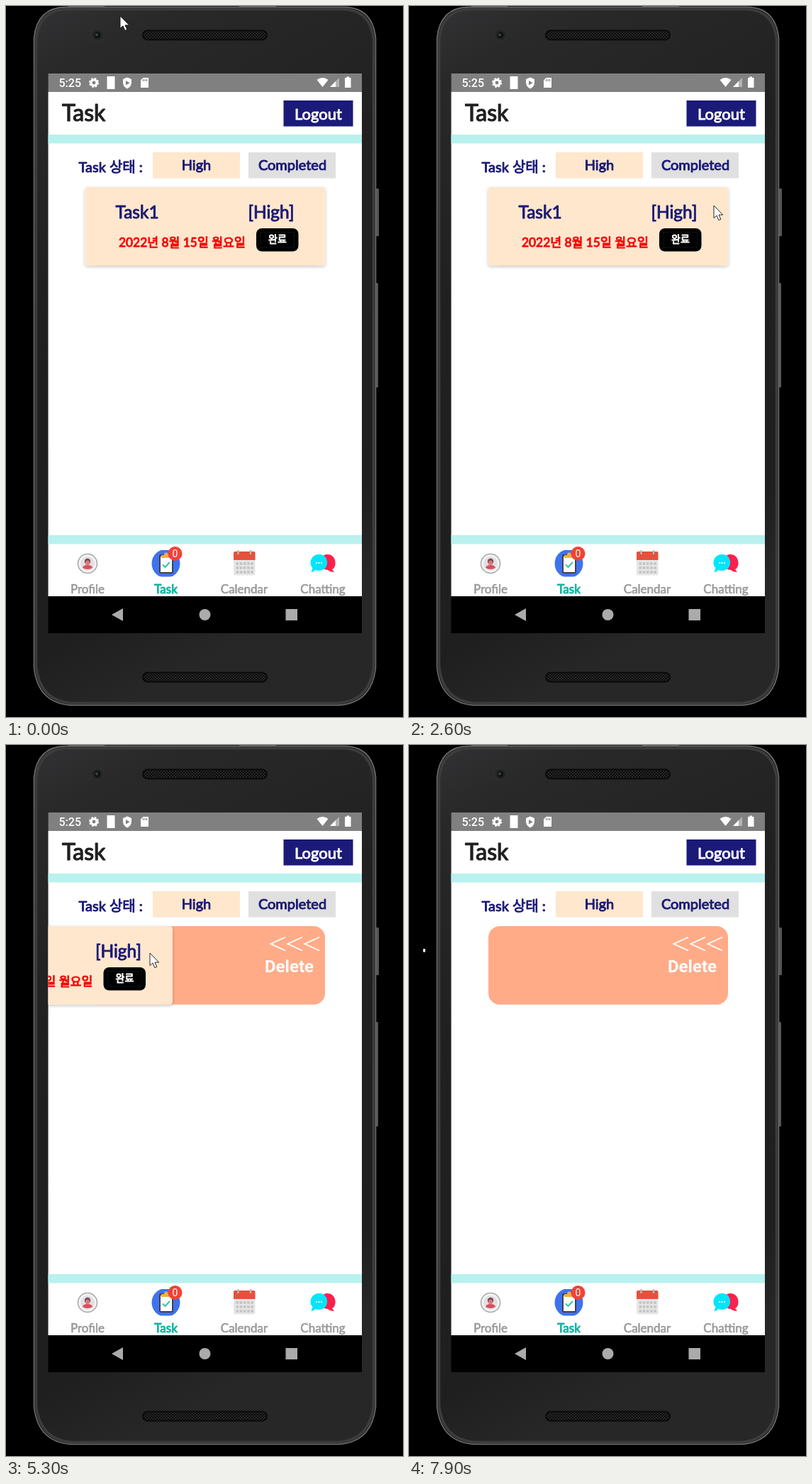
Recreate the animation shown at these times as an HTML page. Size 560 by 1001 pixels, loop 8 s.

```html
<!DOCTYPE html>
<html lang="ko">
<head>
<meta charset="utf-8">
<title>Task list</title>
<style>
html, body { margin: 0; width: 100%; height: 100%; overflow: hidden; background: #000; }
svg { display: block; width: 560px; height: 1001px; }
text { font-family: Lato, "Noto Sans CJK KR", "Noto Sans CJK", sans-serif; stroke-linecap: round; stroke-linejoin: round; stroke: currentColor; stroke-width: .95px; fill: currentColor; }
.mid { text-anchor: middle; }
.navy { color: #1b1a75; }
.title { font-size: 32px; color: #202020; stroke-width: 1.2px; }
.sys { font-family: Roboto, sans-serif; stroke: none; }
.label { font-size: 17px; color: #999; text-anchor: middle; stroke-width: .6px; }
.label.on { color: #12b3a1; stroke-width: 1px; }
</style>
</head>
<body>
<svg viewBox="0 0 560 1001">
  <defs>
    <linearGradient id="body" x2=".25" y2="1">
      <stop offset="0" stop-color="#323234"/><stop offset=".1" stop-color="#29292a"/>
      <stop offset=".4" stop-color="#202020"/><stop offset=".88" stop-color="#1f1f1f"/>
      <stop offset="1" stop-color="#272727"/>
    </linearGradient>
    <pattern id="mesh" width="4" height="4" patternUnits="userSpaceOnUse">
      <rect width="4" height="4" fill="#292929"/>
      <circle cx="1" cy="1" r="1.15" fill="#080808"/><circle cx="3" cy="3" r="1.15" fill="#080808"/>
    </pattern>
    <clipPath id="screen"><rect x="59.500" y="95" width="442.500" height="736"/></clipPath>
    <clipPath id="disc"><rect x="204" y="766" width="44" height="37.500"/></clipPath>
    <filter id="shade" x="-10%" y="-10%" width="120%" height="130%">
      <feDropShadow dx="0" dy="1.500" stdDeviation="2" flood-color="#000" flood-opacity=".24"/>
    </filter>
  </defs>
  <rect width="560" height="1001"/>

  <!-- phone -->
  <g fill="#555">
    <rect x="520" y="257" width="6" height="67" rx="1"/>
    <rect x="520" y="390" width="5" height="147" rx="1"/>
    <rect x="88" width="51" height="2"/><rect x="329" width="52" height="2"/>
  </g>
  <path d="M84 1.500H477Q517 2 521.500 45V932Q516 981 470 984.500H91Q45 981 39.500 932V45Q44 2 84 1.500Z" fill="url(#body)" stroke="#707070" stroke-width="1.500"/>
  <path d="M86 4.500H475Q514 5.500 518.500 47V930Q513 978 469 981.500H92Q48 978 42.500 930V47Q47 5.500 86 4.500Z" fill="none" stroke="#3c3c3c" stroke-width="3.500"/>
  <circle cx="129" cy="41" r="8.500" fill="#242526" stroke="#333"/>
  <circle cx="129" cy="41" r="4.500" fill="#101212"/><circle cx="128" cy="40.500" r="2" fill="#3c4343"/>
  <rect x="193" y="34.500" width="175" height="13" rx="6.500" fill="url(#mesh)" stroke="#0a0a0a" stroke-width="2"/>
  <rect x="193" y="938.500" width="175" height="13" rx="6.500" fill="url(#mesh)" stroke="#0a0a0a" stroke-width="2"/>
  <rect x="59.500" y="95" width="442.500" height="788"/>

  <g clip-path="url(#screen)">
    <rect x="59" y="121" width="444" height="710" fill="#fff"/>

    <!-- status bar -->
    <rect x="59" y="95" width="444" height="26" fill="#808080"/>
    <text x="74.500" y="114" class="sys" font-size="16" font-weight="500" color="#fff">5:25</text>
    <g fill="#fff">
      <circle cx="124" cy="108" r="4" fill="none" stroke="#fff" stroke-width="3.200"/>
      <circle cx="124" cy="108" r="6" fill="none" stroke="#fff" stroke-width="2" stroke-dasharray="2.700 2.012"/>
      <rect x="142.500" y="99" width="11" height="18"/>
      <path d="M171 100.500L177 103V108Q176.500 114 171 116.500Q165.500 114 165 108V103Z"/>
      <path d="M169 105L174.500 108.300L169 111.500Z" fill="#808080"/>
      <path d="M193.500 101H201V115H190V104.500Z"/>
      <path d="M193.500 103V106M196 103V106M198.500 103V106" stroke="#808080" stroke-width="1.200"/>
      <path d="M438.500 104Q446.500 98 454.500 104L446.500 114Z"/>
      <path d="M470 101V114H457Z" opacity=".4"/><path d="M465 106V114H457Z"/>
      <path d="M480.500 101V99.500H484V101H486.500V115H478V101Z"/>
    </g>

    <!-- header -->
    <text x="79" y="161.500" class="title">Task</text>
    <rect x="391.500" y="133" width="98" height="36.500" fill="#1b1a78"/>
    <text x="440.500" y="159.500" class="mid" font-size="22" color="#fff">Logout</text>
    <rect x="59" y="181" width="444" height="12.500" fill="#b8f1ed"/>
    <rect x="59" y="745" width="444" height="12.500" fill="#b8f1ed"/>

    <!-- filter row -->
    <text x="102.500" y="233.500" class="navy" font-size="20">Task 상태 :</text>
    <rect x="207" y="206" width="123" height="36.500" fill="#ffe7cd"/>
    <text x="268.500" y="231" class="navy mid" font-size="20">High</text>
    <rect x="342" y="206" width="123" height="36.500" fill="#e0e0e0"/>
    <text x="404" y="231" class="navy mid" font-size="20">Completed</text>

    <!-- layer under the card -->
    <rect x="112" y="255" width="338" height="110.500" rx="16" fill="#ffab88"/>
    <path d="M394 270.500L373.500 280L394 289.500M418 270.500L397.500 280L418 289.500M442 270.500L421.500 280L442 289.500" fill="none" stroke="#fff" stroke-width="1.900"/>
    <text x="399.500" y="320" class="sys mid" font-size="24" font-weight="700" color="#fff">Delete</text>

    <g id="card">
      <rect x="111.500" y="255" width="339" height="110.500" rx="4" fill="#ffe7cd" filter="url(#shade)"/>
      <text x="154.500" y="298.500" class="navy" font-size="24.500">Task1</text>
      <text x="374" y="298.500" class="navy mid" font-size="24.500">[High]</text>
      <text x="248.500" y="339" class="mid" font-size="17.300" color="#f40808">2022년 8월 15일 월요일</text>
      <rect x="353" y="313" width="59.500" height="32.500" rx="8"/>
      <rect x="359" y="318.500" width="47.500" height="21.500" fill="none" stroke="#0b1218"/>
      <text x="383" y="333" class="mid" font-size="14" color="#fff">완료</text>
    </g>

    <!-- tabs -->
    <circle cx="115" cy="785" r="13.500" fill="#f4f4f4" stroke="#aaa" stroke-width="1.600"/>
    <circle cx="115" cy="785" r="10" fill="#e2dee4"/>
    <path d="M108 791Q109 787 115 787Q121 787 122 791Q119 793 115 793Q111 793 108 791Z" fill="#d9505b"/>
    <circle cx="115" cy="782" r="4.200" fill="#7d4b59"/><ellipse cx="115" cy="784" rx="2.800" ry="3.300" fill="#dc7c70"/>

    <circle cx="225.500" cy="785" r="20" fill="#3d73ee" clip-path="url(#disc)"/>
    <rect x="216" y="772" width="20" height="27" rx="2" fill="#45404b"/>
    <rect x="218" y="775" width="16" height="22" fill="#fff"/>
    <path d="M219 777V773H223Q223 769.500 226 769.500Q229 769.500 229 773H233V777Z" fill="#efb03f"/>
    <path d="M221 786.500L224.500 790L231 783" fill="none" stroke="#36c6a0" stroke-width="2"/>
    <circle cx="238.500" cy="771" r="10" fill="#f34235"/>
    <text x="238.500" y="776" class="sys mid" font-size="14" color="#fff">0</text>

    <rect x="321" y="768" width="30.500" height="33.500" rx="2" fill="#e6e6e6"/>
    <path d="M321 780V770Q321 768 323 768H349.500Q351.500 768 351.500 770V780Z" fill="#e4513c"/>
    <path d="M327.500 766V772M345 766V772" stroke="#b9b9b9" stroke-width="2.400"/>
    <path d="M324.500 785H349M324.500 791H349M324.500 797H349" stroke="#c4c4c4" stroke-width="3.500" stroke-dasharray="3.600 1.600"/>

    <path d="M453 772C467 772 467 791 460 793L463 797Q457 797 454 794C440 794 441 772 453 772Z" fill="#fa214f"/>
    <path d="M441.500 772C457 772 457 795 441.500 795Q438 795 436 794Q434 797 430.500 797L432.500 791C426 784 431 772 441.500 772Z" fill="#02e5fa"/>
    <path d="M437 784H446" stroke="#fff" stroke-width="2" stroke-dasharray="2 1.500"/>

    <text x="115" y="827" class="label">Profile</text>
    <text x="225.500" y="827" class="label on">Task</text>
    <text x="336" y="827" class="label">Calendar</text>
    <text x="447" y="827" class="label">Chatting</text>
  </g>

  <!-- system keys -->
  <g fill="#ababab">
    <path d="M149 857L165 848V866Z"/><circle cx="280.500" cy="857" r="8"/><rect x="394.500" y="849" width="16.500" height="16"/>
  </g>

  <path id="cursor" d="M0 0V17.500L4 14L6.800 20.500L9.800 19.300L7 13H12.700Z" fill="#fff" stroke="#111" stroke-width=".9"/>
  <rect id="speck" x="20" y="287" width="3" height="4.500" fill="#fff"/>
</svg>
<script>
const LOOP = 8000, STEP = 100;

// time, x, y
const pointer = [
  [0, 161, 14], [300, 215, 62], [600, 286, 140], [900, 348, 215], [1300, 393, 266],
  [1700, 413, 285], [1800, 416, 284], [2600, 430, 281], [3000, 430, 281], [3100, 429, 280],
  [3400, 429, 280], [3500, 421, 340], [3700, 421, 340], [4000, 419, 315], [4400, 424, 279],
  [4600, 421, 287], [4700, 407, 292], [4900, 343, 294], [5300, 203, 293], [5500, 187, 293],
  [6000, 62, 290], [6200, 32, 288], [6400, 27, 288], [6700, 22, 288], [6900, 21, 288], [7100, 20, 288]
];
// time, card shift
const drag = [
  [4600, 0], [4700, -4], [4900, -57], [5300, -215.5], [5500, -232],
  [6000, -352], [6200, -362], [7100, -362], [7200, -376], [7300, -460]
];

function at(track, t) {
  const n = track.findIndex(k => k[0] > t);
  if (n < 0) return track[track.length - 1].slice(1);
  if (n === 0) return track[0].slice(1);
  const a = track[n - 1], b = track[n], p = (t - a[0]) / (b[0] - a[0]);
  return a.slice(1).map((v, i) => v + (b[i + 1] - v) * p);
}

const el = id => document.getElementById(id);
const card = el("card"), cursor = el("cursor"), speck = el("speck");
const start = performance.now();

function draw(now) {
  const t = Math.floor((Math.max(0, now - start) % LOOP) / STEP) * STEP;
  const gone = t >= 7300;
  card.setAttribute("transform", `translate(${at(drag, t)[0]})`);
  cursor.setAttribute("transform", `translate(${at(pointer, t)})`);
  cursor.setAttribute("visibility", gone ? "hidden" : "visible");
  speck.setAttribute("visibility", gone ? "visible" : "hidden");
  requestAnimationFrame(draw);
}
draw(start);
</script>
</body>
</html>
```
